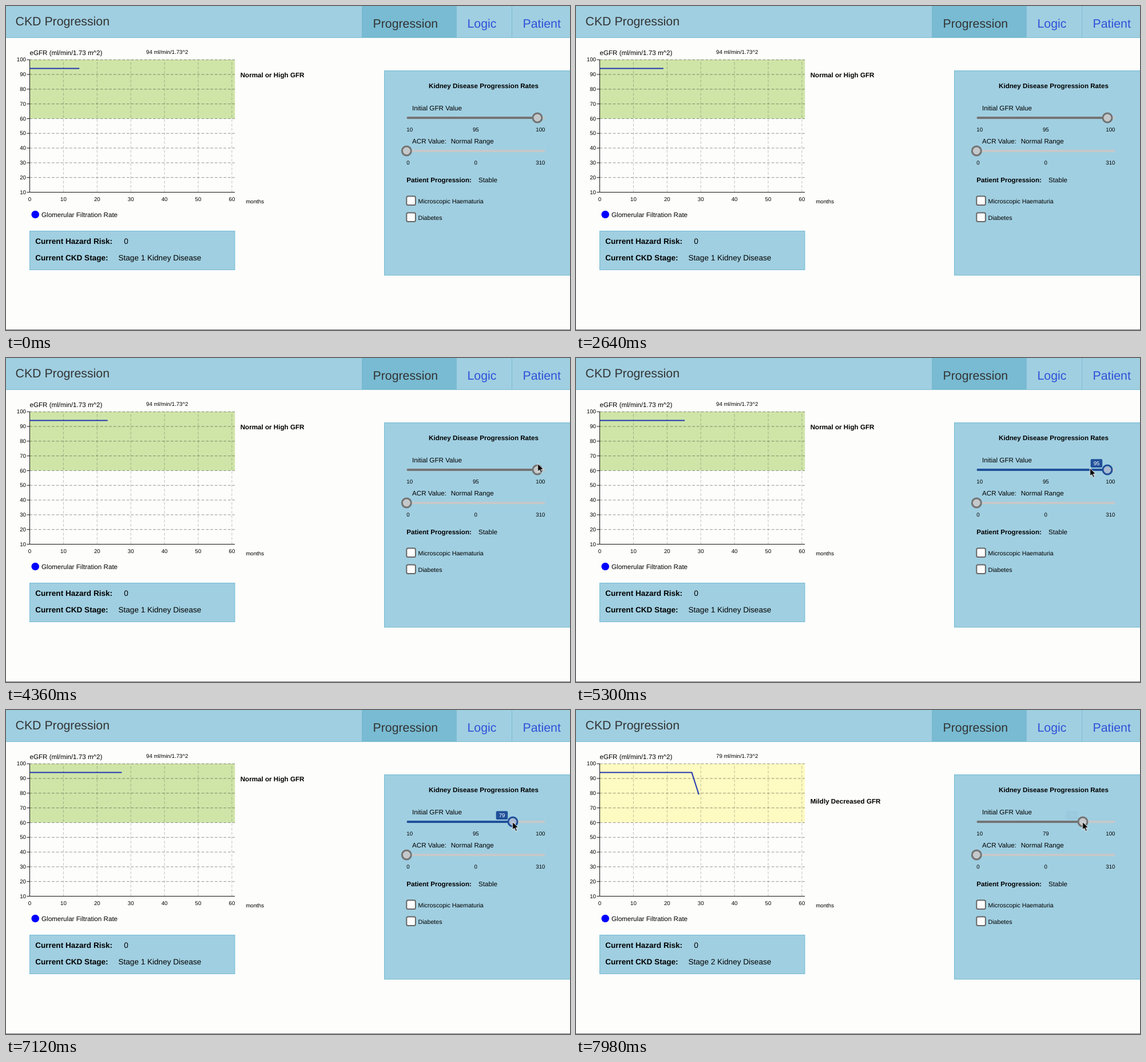
Recreate the animation shown at these times as an HTML page. Size 986x568 px, loop 8000 ms.

```html
<!DOCTYPE html>
<html lang="en">
<head>
<meta charset="utf-8">
<title>CKD Progression</title>
<style>
  html, body { margin: 0; width: 100%; height: 100%; overflow: hidden; background: #fdfdfc; }
  svg { display: block; width: 986px; height: 568px; }
  text { font: 11.63px "Liberation Sans", Arial, sans-serif; text-rendering: geometricPrecision; }
  .big { font-size: 21.3px; fill: #333; }
  .link { fill: #2f50d8; }
  .mid { font-size: 13.57px; }
  .small { font-size: 10.66px; }
  .tiny { font-size: 9.69px; }
  .bold { font-weight: bold; }
  .end { text-anchor: end; }
  .center { text-anchor: middle; }

  .panel { fill: #a0cfe1; stroke: #73bad3; }
  .rows { stroke: #000; stroke-opacity: .42; stroke-dasharray: 4.8 2.9; }
  .cols { stroke: #000; stroke-opacity: .24; stroke-dasharray: 4.8 2.9; }
  .axis { fill: none; stroke: #111; }
  .track { fill: #c8c8c9; }
  .fill { fill: #747474; }
  .thumb { fill: #c5c8ca; stroke: #737373; stroke-width: 3; }
  .check { fill: #fdfdfd; stroke: #666; stroke-width: 2; }

  .line, .band, .before, .after, .fill.live, .thumb.live, .grip, .bar, .old, .new, .tip, .cursor {
    animation: 8s linear infinite;
  }
  .line { fill: none; stroke: #2438b0; stroke-width: 2; stroke-dasharray: 300; animation-name: grow; animation-timing-function: step-end; }
  .band { animation-name: band; animation-timing-function: step-end; }
  .before, .after, .old, .new, .grip, .bar { animation-timing-function: step-end; }
  .before { animation-name: hide-late; }
  .after { animation-name: show-late; }
  .old { animation-name: hide-drag; }
  .new { animation-name: show-drag; }
  .grip { animation-name: drag; }
  .bar { animation-name: shrink; transform-origin: 700.5px 0; }
  .fill.live { animation-name: track-tint; }
  .thumb.live { animation-name: thumb-tint; }
  .tip { animation-name: tip; }
  .cursor { animation-name: pointer; }

  /* one sample every 1275 ms, each 12.38 px further */
  @keyframes grow {
    0% { stroke-dashoffset: 213.3px; }
    2.375% { stroke-dashoffset: 201px; }
    18.31% { stroke-dashoffset: 188.6px; }
    34.25% { stroke-dashoffset: 176.2px; }
    50.19% { stroke-dashoffset: 163.8px; }
    66.125% { stroke-dashoffset: 151.4px; }
    82.06% { stroke-dashoffset: 139.1px; }
    98%, 100% { stroke-dashoffset: 0; }
  }
  @keyframes band { 0% { fill: #cfe5a8; } 98%, 100% { fill: #fdfac2; } }
  @keyframes hide-late { 0% { visibility: visible; } 98%, 100% { visibility: hidden; } }
  @keyframes show-late { 0% { visibility: hidden; } 98%, 100% { visibility: visible; } }
  @keyframes hide-drag { 0% { visibility: visible; } 82.06%, 100% { visibility: hidden; } }
  @keyframes show-drag { 0% { visibility: hidden; } 82.06%, 100% { visibility: visible; } }
  @keyframes drag { 0% { transform: translateX(929px); } 82.06%, 100% { transform: translateX(886px); } }
  @keyframes shrink { 0% { transform: none; } 82.06%, 100% { transform: scaleX(.812); } }
  @keyframes track-tint { 0%, 58.75% { fill: #747474; } 60.75%, 94% { fill: #205099; } 97%, 100% { fill: #747474; } }
  @keyframes thumb-tint {
    0%, 58.75% { fill: #c5c8ca; stroke: #737373; }
    60.75%, 94% { fill: #a9bad2; stroke: #205099; }
    97%, 100% { fill: #c5c8ca; stroke: #737373; }
  }
  @keyframes tip { 0%, 58.75% { opacity: 0; } 60.75%, 94% { opacity: 1; } 96.25% { opacity: .25; } 99.75%, 100% { opacity: .04; } }
  @keyframes pointer {
    0%, 41% { transform: translate(990px, 236px); }
    50% { transform: translate(930px, 187px); }
    54.5%, 60% { transform: translate(929.5px, 185px); }
    66.25% { transform: translate(898.5px, 193px); }
    79% { transform: translate(890.5px, 195px); }
    85%, 100% { transform: translate(885.5px, 196px); }
  }
</style>
</head>
<body>
<svg viewBox="0 0 986 568">
  <path d="M0 567.5H986" stroke="#777"/>

  <rect width="986" height="55" fill="#a0cfe1"/>
  <rect x="622" width="166" height="55" fill="#78bbd2"/>
  <path d="M0 55.5H986M787.5 0V55M884.5 0V55" stroke="#7cbdd5"/>
  <text class="big" x="16.5" y="34">CKD Progression</text>
  <text class="big" x="641.5" y="37.5">Progression</text>
  <text class="big link" x="806.5" y="37.5">Logic</text>
  <text class="big link" x="903.5" y="37.5">Patient</text>

  <text x="41.5" y="86">eGFR (ml/min/1.73 m^2)</text>
  <text class="tiny before" x="245" y="84">94 ml/min/1.73^2</text>
  <text class="tiny after" x="245" y="84">79 ml/min/1.73^2</text>
  <rect class="band" x="41.5" y="94" width="358.7" height="103.3"/>
  <g id="grid"></g>
  <path class="axis" d="M41.5 94V326.5H400"/>
  <path class="line" d="M41.5 109.6H202.4L214.8 148.2"/>
  <text class="tiny" x="419.3" y="345.5">months</text>
  <circle cx="51.2" cy="365.5" r="6.8" fill="#00f"/>
  <text x="62" y="370">Glomerular Filtration Rate</text>
  <text class="bold before" x="409.7" y="124.7">Normal or High GFR</text>
  <text class="bold after" x="409.7" y="163.6">Mildly Decreased GFR</text>

  <rect class="panel" x="41.5" y="394.5" width="358.5" height="68"/>
  <text class="mid bold" x="51.2" y="417.3">Current Hazard Risk:</text>
  <text class="mid" x="206.3" y="417.3">0</text>
  <text class="mid bold" x="51.2" y="446.3">Current CKD Stage:</text>
  <text class="mid before" x="196.5" y="446.3">Stage 1 Kidney Disease</text>
  <text class="mid after" x="196.5" y="446.3">Stage 2 Kidney Disease</text>

  <rect class="panel" x="661.5" y="113.5" width="340" height="358.5"/>
  <text class="bold" x="739" y="144">Kidney Disease Progression Rates</text>

  <text x="710" y="183">Initial GFR Value</text>
  <rect class="track" x="700.5" y="194" width="242" height="4" rx="2"/>
  <g class="bar"><rect class="fill live" x="700.5" y="194" width="228.5" height="4" rx="2"/></g>
  <g class="grip">
    <circle class="thumb live" cy="196" r="8"/>
    <g class="tip">
      <rect x="-29.3" y="177.3" width="20.5" height="14.8" rx="2" fill="#205099"/>
      <g fill="#fff">
        <text class="tiny center old" x="-19" y="188.2">95</text>
        <text class="tiny center new" x="-19" y="188.2">79</text>
      </g>
    </g>
  </g>
  <text class="tiny" x="700.3" y="219.7">10</text>
  <text class="tiny center before" x="821.3" y="219.7">95</text>
  <text class="tiny center after" x="821.3" y="219.7">79</text>
  <text class="tiny end" x="942.5" y="219.7">100</text>

  <text x="710" y="241">ACR Value:</text>
  <text x="777.7" y="241">Normal Range</text>
  <rect class="track" x="700.5" y="252" width="242" height="4" rx="2"/>
  <circle class="thumb" cx="700.3" cy="254" r="8"/>
  <text class="tiny" x="700.3" y="277.7">0</text>
  <text class="tiny center" x="821.3" y="277.7">0</text>
  <text class="tiny end" x="942.5" y="277.7">310</text>

  <text class="bold" x="700.2" y="309">Patient Progression:</text>
  <text x="826" y="309">Stable</text>
  <rect class="check" x="700.3" y="333.5" width="15.6" height="15.6" rx="2.5"/>
  <text class="small" x="720.5" y="346">Microscopic Haematuria</text>
  <rect class="check" x="700.3" y="362.5" width="15.6" height="15.6" rx="2.5"/>
  <text class="small" x="720.5" y="375">Diabetes</text>

  <path class="cursor" d="M0 0V14.2L3.3 11.2L5.7 16.6L8.2 15.5L5.8 10.3H10.2Z" fill="#000" stroke="#fff" stroke-width="1"/>
</svg>
<script>
  const left = 41.5, right = 400, top_ = 94.2, bottom = 326.5;
  let grid = '';
  for (let value = 10; value <= 100; value += 10) {
    const y = bottom - (value - 10) / 90 * (bottom - top_);
    if (value > 10) grid += `<path class="rows" d="M${left} ${y}H${right}"/>`;
    grid += `<path class="axis" d="M36.5 ${y}H${left}"/>
      <text class="tiny end" x="35" y="${y + 3.1}">${value}</text>`;
  }
  for (let month = 0; month <= 60; month += 10) {
    const x = left + month * 5.89;
    if (month) grid += `<path class="cols" d="M${x} ${bottom}V${top_}"/>`;
    grid += `<text class="tiny center" x="${x}" y="341.6">${month}</text>`;
  }
  document.getElementById('grid').innerHTML = grid;
</script>
</body>
</html>
```
